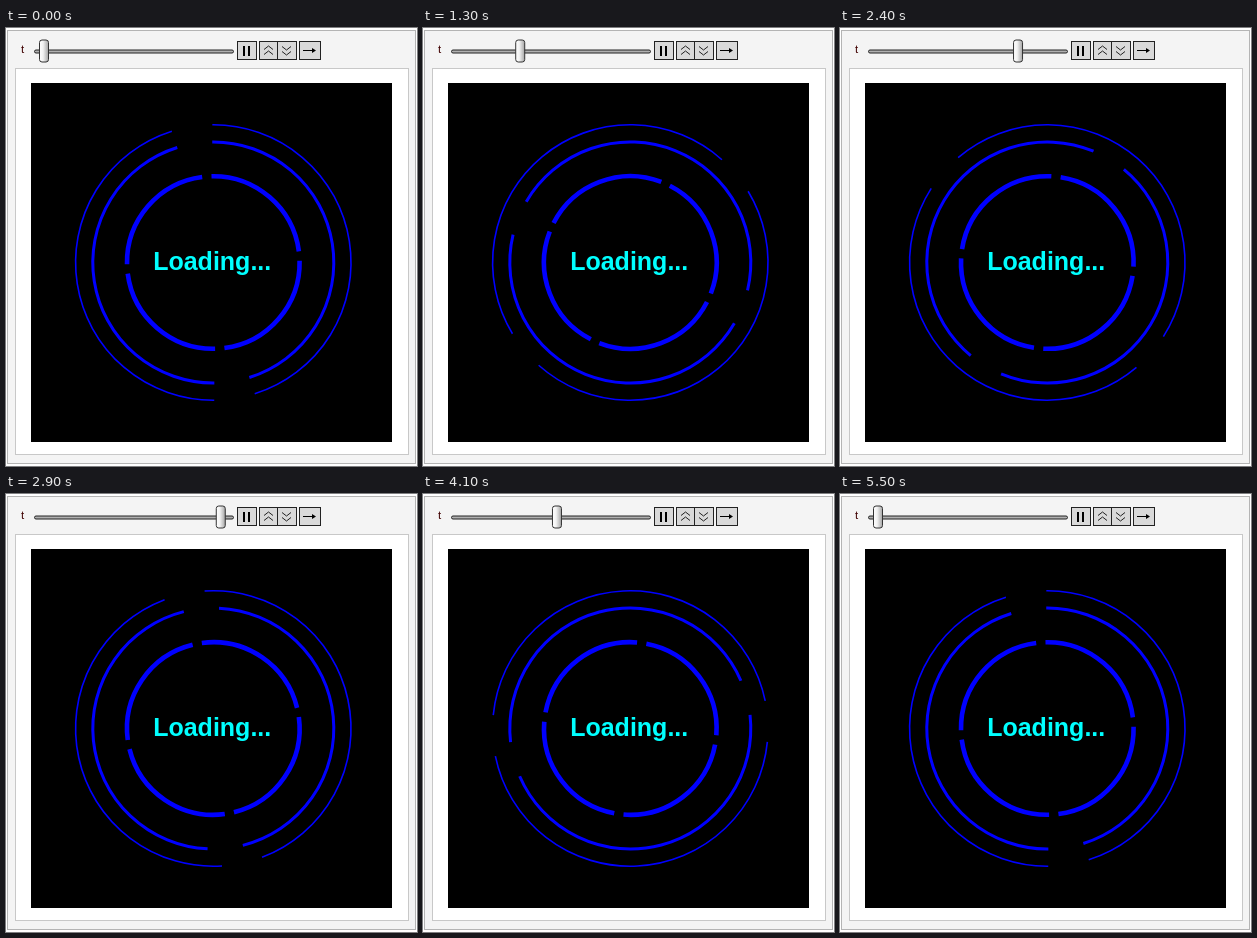
Recreate the animation shown at these times as an HTML page. Size 411 px wide and 438 px high, loop 6000 ms.

```html
<!DOCTYPE html>
<html lang="en">
<head>
<meta charset="utf-8">
<title>Loading rings</title>
<style>
html, body { margin: 0; width: 100%; height: 100%; overflow: hidden; background: #fff; }
svg { display: block; }
text { font-family: "Liberation Sans", Arial, sans-serif; }
</style>
</head>
<body>
<svg width="411" height="438" viewBox="0 0 411 438">
  <defs>
    <linearGradient id="knob">
      <stop offset="0" stop-color="#fff"/>
      <stop offset=".4" stop-color="#f2f2f2"/>
      <stop offset="1" stop-color="#a4a4a4"/>
    </linearGradient>
  </defs>
  <rect x="1.5" y="2.5" width="408" height="433" fill="#f4f4f4" stroke="#b4b4b4"/>
  <rect x="9.5" y="40.5" width="393" height="386" fill="#fff" stroke="#c8c8c8"/>
  <rect x="25" y="55" width="361" height="359"/>

  <text x="15" y="25" font-size="11.5" fill="#400000">t</text>
  <rect x="28.5" y="22" width="199" height="3" rx="1.5" fill="#b0b0b0" stroke="#222"/>
  <g id="thumb">
    <rect x="33.5" y="12" width="9" height="22" rx="2.5" fill="url(#knob)" stroke="#333"/>
  </g>

  <g fill="#d9d9d9" stroke="#222">
    <rect x="231.5" y="13.5" width="19" height="18"/>
    <rect x="253.5" y="13.5" width="18" height="18"/>
    <rect x="271.5" y="13.5" width="19" height="18"/>
    <rect x="293.5" y="13.5" width="21" height="18"/>
  </g>
  <path d="M237 18h2v10h-2zM242 18h2v10h-2zM306 20l4 2.5l-4 2.5z"/>
  <path d="M297 22.5h10" stroke="#000"/>
  <path d="M258 21.5l4.5-3.5l4.5 3.5M258 26.5l4.5-3.5l4.5 3.5M276 18.5l4.5 3.5l4.5-3.5M276 23.5l4.5 3.5l4.5-3.5"
        fill="none" stroke="#222"/>

  <g id="rings" transform="translate(207.3 234.5)" fill="none" stroke="#00f"></g>
  <text x="206.2" y="242" font-size="25" font-weight="bold" fill="#0ff" text-anchor="middle">Loading...</text>
</svg>
<script>
const STEP = 100, REST = 500, LOOP = 6000, FRAMES = 50;
const SWEEP = 180 / 24.5;   // degrees per step, also thumb pixels
const LEAD = 0.45;          // small advance while the slider is running

// Gap start and size are in degrees, counterclockwise from the right.
const rings = [
  { r: 137.7, width: 1.6, arcs: 2, start: 90.4, gap: 17.1, speed: 1 },
  { r: 120.5, width: 3, arcs: 2, start: 90.5, gap: 16.9, speed: -1 },
  { r: 86.3, width: 4.6, arcs: 4, start: 91.2, gap: 6.2, speed: 2 }
];

function point(r, deg) {
  const a = deg * Math.PI / 180;
  return `${(r * Math.cos(a)).toFixed(3)} ${(-r * Math.sin(a)).toFixed(3)}`;
}

function ringPath({ r, arcs, start, gap }) {
  const pitch = 360 / arcs;
  let d = "";
  for (let i = 0; i < arcs; i++) {
    const from = start + gap + i * pitch;
    d += `M${point(r, from)}A${r} ${r} 0 0 0 ${point(r, from + pitch - gap)}`;
  }
  return d;
}

const holder = document.getElementById("rings");
const thumb = document.getElementById("thumb");
for (const ring of rings) {
  ring.el = document.createElementNS("http://www.w3.org/2000/svg", "path");
  ring.el.setAttribute("d", ringPath(ring));
  ring.el.setAttribute("stroke-width", ring.width);
  holder.append(ring.el);
}

function angleAt(ms) {
  const n = Math.floor((ms % LOOP - REST) / STEP);
  if (n < 0 || n >= FRAMES) return 0;
  return LEAD + SWEEP * Math.min(n, FRAMES - 1 - n);
}

function draw(ms) {
  const angle = angleAt(ms);
  thumb.setAttribute("transform", `translate(${angle} 0)`);
  for (const ring of rings) {
    ring.el.setAttribute("transform", `rotate(${ring.speed * angle})`);
  }
}

const begin = performance.now();
function tick() {
  draw(performance.now() - begin);
  requestAnimationFrame(tick);
}
tick();
</script>
</body>
</html>
```
